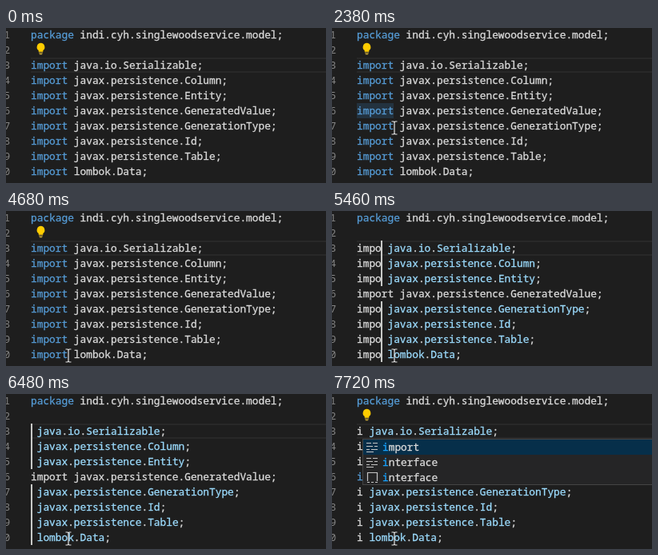
Write an HTML page that moves like this. It is 400 by 194 pixels and loops after 8000 ms.

```html
<!DOCTYPE html>
<html lang="en">
<head>
<meta charset="utf-8">
<style>
  html, body { margin: 0; width: 100%; height: 100%; overflow: hidden; background: #1e1e1e; }
  svg { display: block; }
  text { font: 12.82px "Noto Sans Mono", "DejaVu Sans Mono", monospace; white-space: pre; }
  text, tspan { fill: currentColor; stroke: currentColor; stroke-width: .3; }
  text { color: #dcdcdc; }
  .keyword { color: #569cd6; }
  .variable { color: #9cdcfe; }
  .match { color: #18a3ff; }
  .number { color: #858585; stroke: none; }
</style>
</head>
<body>
<svg width="400" height="194" viewBox="0 0 400 194">
  <rect width="400" height="194" fill="#1e1e1e"/>
  <path d="M31 38H400M31 55H400" stroke="#282828" stroke-width="2"/>
  <rect id="wordMark" x="31" width="46" height="19" fill="#23323f"/>
  <g id="numbers"></g>
  <g id="code"></g>
  <g id="carets" fill="#c8c9c7"></g>
  <g id="bulb">
    <path d="M43.5 18.8a5.1 5.1 0 0 0-2.8 9.2V29.8h5.6V28A5.1 5.1 0 0 0 43.5 18.8z" fill="#ffcc00"/>
    <path d="M41 31h5M41.8 32.6h3.4" stroke="#c9a93a" stroke-width="1.2"/>
  </g>
  <g id="popup">
    <rect x="38.5" y="56.5" width="370" height="57" fill="#252526" stroke="#454545"/>
    <rect x="39" y="57" width="361" height="19" fill="#062f4a"/>
    <g id="items" fill="none" stroke="#c5c5c5" stroke-width="1.2"></g>
  </g>
  <circle id="ring" r="11.5" fill="#ffff00" opacity=".58"/>
  <path id="mouse" d="M-3.5 -8H-1L0 -7L1 -8H3.5M0 -7V7M-3.5 8H-1L0 7L1 8H3.5" fill="none" stroke="#e4e4e4" stroke-width="1.2"/>
</svg>
<script>
const LOOP = 8000, LINE = 19, LEFT = 31, BLINK = 460, PRESS = 80, PAUSE = 150;
const WORD = "import", SKIPPED = 6, RETYPE = 7180;

const $ = id => document.getElementById(id);
const lineTop = n => 37 + (n - 3) * LINE;
const lineAt = y => Math.floor((y - 37) / LINE) + 3;
const baseline = n => lineTop(n) + 14;
const caretX = col => Math.floor(LEFT + 7.6 * col);
const show = (el, on) => el.setAttribute("visibility", on ? "visible" : "hidden");
const move = (el, x, y) => el.setAttribute("transform", `translate(${x} ${y})`);
const span = (cls, s) => `<tspan class="${cls}">${s}</tspan>`;
const text = (x, y, s, cls = "") => `<text class="${cls}" x="${x}" y="${y}">${s}</text>`;

const imports = ["java.io.Serializable", ...["Column", "Entity", "GeneratedValue", "GenerationType", "Id", "Table"]
  .map(name => "javax.persistence." + name), "lombok.Data"];

const erasures = [5140, 5460, 5610, 5780, 6080, 6480];
const clicks = [[1070, 65], [1380, 78], [1910, 121], [2990, 143], [3760, 168], [4220, 181]]
  .map(([at, y]) => ({ at, x: 78, y }));
const stops = [{ at: -10, x: 282, y: 187 }, ...clicks];
const actions = [...clicks.map(c => c.at), ...erasures, RETYPE];

// The pointer rests on each stop, then accelerates and halts shortly before the next click.
function pointer(t) {
  const i = stops.findLastIndex(s => t >= s.at);
  const from = stops[i], to = stops[i + 1] || from;
  const begin = from.at + PRESS, span = to.at - PAUSE - begin;
  const k = Math.min(1, Math.max(0, (t - begin) / span)) ** 2;
  return [from.x + (to.x - from.x) * k, from.y + (to.y - from.y) * k].map(Math.floor);
}

function prefixAt(t) {
  if (t >= RETYPE) return WORD[0];
  return WORD.slice(0, WORD.length - erasures.filter(at => t >= at).length);
}

// Every action relights the carets and restarts their blinking.
function caretsLit(t) {
  const last = actions.findLast(at => t >= at);
  return last !== undefined && (t - last) % (2 * BLINK) < BLINK;
}

function importLine(name, n, t) {
  const edited = t >= erasures[0];
  if (!edited || (n === SKIPPED && t >= RETYPE)) return span("keyword", WORD) + ` ${name};`;
  if (n === SKIPPED) return `${WORD} ${name};`;
  return `${prefixAt(t)} ${name.replace(/\w+/g, w => span("variable", w))};`;
}

let drawn;
function drawCode(t) {
  const lines = imports.map((name, i) => text(LEFT, baseline(i + 3), importLine(name, i + 3, t)));
  const head = span("keyword", "package") + " indi.cyh.singlewoodservice.model;";
  const markup = text(LEFT, baseline(1), head) + lines.join("");
  if (markup !== drawn) $("code").innerHTML = drawn = markup;
}

function drawCarets(t) {
  const x = caretX(prefixAt(t).length);
  const lines = [3, ...clicks.filter(c => t >= c.at).map(c => lineAt(c.y))];
  $("carets").innerHTML = caretsLit(t)
    ? lines.map(n => `<rect x="${x}" y="${lineTop(n)}" width="2" height="${LINE}"/>`).join("")
    : "";
}

function render(t) {
  drawCode(t);
  drawCarets(t);

  const [x, y] = pointer(t);
  move($("mouse"), x, y);
  move($("ring"), x - 1, y);
  show($("mouse"), t >= stops[0].at + PRESS);
  show($("ring"), clicks.some(c => t >= c.at && t < c.at + PRESS));

  show($("wordMark"), t >= 1760 && t < 2530);
  show($("bulb"), t < erasures[1] || t >= RETYPE + 540);
  show($("popup"), t >= RETYPE + PRESS);
}

$("wordMark").setAttribute("y", lineTop(SKIPPED));
$("numbers").innerHTML = Array.from({ length: 10 }, (_, i) =>
  text(-2.5, baseline(i + 1), (i + 1) % 10, "number")).join("");

const keywordIcon = "M43 61.5h6M51 61.5h6M43 65.5h8M53 65.5h4M43 69.5h4M49 69.5h8M43 72.5h9";
const snippetIcon = "M44.5 71V60.5H56.5V71M44 72.5h3M49 72.5h3M54 72.5h3";
$("items").innerHTML = [WORD, "interface", "interface"].map((word, i) =>
  `<path d="${i < 2 ? keywordIcon : snippetIcon}" transform="translate(0 ${i * LINE})"/>`
  + text(63, 71 + i * LINE, span("match", word[0]) + word.slice(1))).join("");

const start = performance.now();
function tick() {
  render((performance.now() - start) % LOOP);
  requestAnimationFrame(tick);
}
tick();
</script>
</body>
</html>
```
